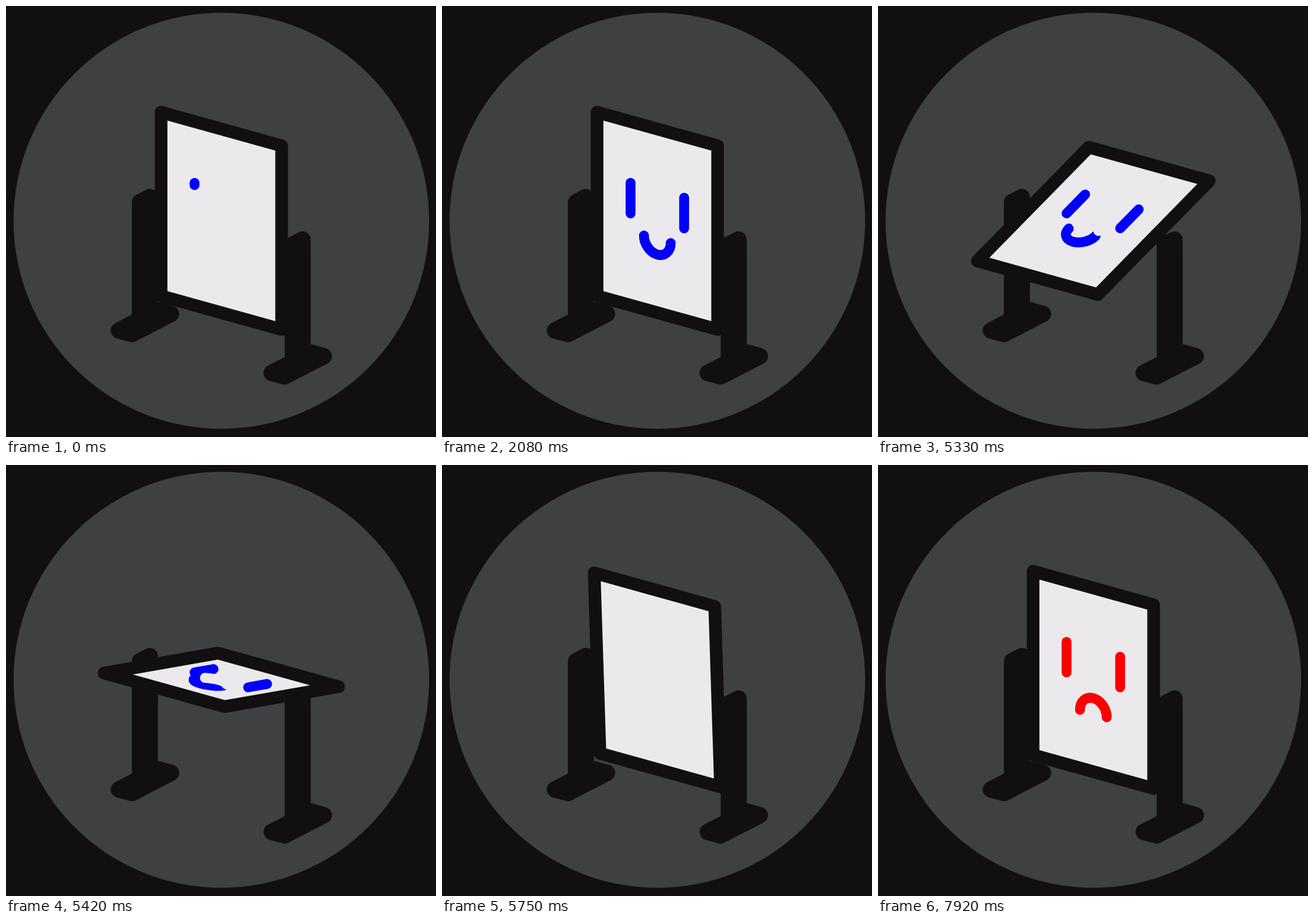
These frames come from a looping animation (748x749 px, 8000 ms). An HTML page with a canvas:

```html
<!DOCTYPE html>
<html lang="en">
<head>
<meta charset="utf-8">
<title>Flipping board</title>
<style>
  html, body { margin: 0; height: 100%; overflow: hidden; background: #110f12; }
  canvas { display: block; }
</style>
</head>
<body>
<canvas id="stage" width="748" height="749"></canvas>
<script>
const ctx = document.getElementById('stage').getContext('2d');
const DARK = '#110f12', GREY = '#3e4041', WHITE = '#ece9ec';
const LOOP = 8000, STEP = 1000 / 12;

// Isometric view: one board unit in pixels, turned by YAW and tilted by PITCH.
const UNIT = 28.8, YAW = Math.PI / 5, PITCH = Math.PI / 8;
const CENTER = [374.6, 373.4];
const ACROSS = [UNIT * Math.cos(YAW), UNIT * Math.sin(YAW) * Math.sin(PITCH)];
const FRONT = [-UNIT * Math.sin(YAW), UNIT * Math.cos(YAW) * Math.sin(PITCH)];
const HEIGHT = UNIT * Math.cos(PITCH);

const clamp = x => Math.min(1, Math.max(0, x));
const smooth = x => x * x * (3 - 2 * x);

function polygon(points, width, fill = DARK) {
  ctx.beginPath();
  points.forEach(([x, y]) => ctx.lineTo(x, y));
  ctx.closePath();
  ctx.fillStyle = fill;
  ctx.fill();
  ctx.strokeStyle = DARK;
  ctx.lineWidth = width;
  ctx.stroke();
}

function leg(dx, dy) {
  ctx.save();
  ctx.translate(dx, dy);
  polygon([[233.3, 341], [250, 332.2], [250, 540], [233.3, 550]], 28.6);
  polygon([[196.5, 564], [219, 570], [287, 535], [264.5, 528.8]], 28.6);
  ctx.restore();
}

// Builds a path in board units, then strokes it with an even screen width.
function line(down, color, build) {
  ctx.save();
  ctx.transform(...ACROSS, ...down, ...CENTER);
  ctx.beginPath();
  build();
  ctx.restore();
  ctx.strokeStyle = color;
  ctx.lineWidth = 17.2;
  ctx.stroke();
}

// Left eye, right eye and mouth appear one after the other.
function face(down, color, happy, progress) {
  const length = progress * 7;
  [-2, 2].forEach((x, i) => {
    const part = Math.min(2, length - 2 * i);
    if (part > 0) line(down, color, () => {
      ctx.moveTo(x, -2);
      ctx.lineTo(x, part - 2);
    });
  });
  const mouth = clamp((length - 4) / 3);
  if (!mouth) return;
  const side = happy ? -1 : 1, y = happy ? 1.2 : 2.2;
  const arc = from => () =>
    ctx.arc(0, y, 1, Math.PI + side * from * Math.PI, Math.PI + side * Math.PI, happy);
  line(down, color, arc(0));
  if (mouth < 1) line(down, WHITE, arc(mouth));
}

function board(t) {
  const u = clamp((t - 5000) / 900);
  const turn = 1 - (1 - u * u) ** 3.5;
  const c = Math.cos(turn * Math.PI), s = Math.sin(turn * Math.PI);
  const down = [FRONT[0] * s, HEIGHT * c + FRONT[1] * s];
  const at = (x, y) => CENTER.map((v, i) => v + ACROSS[i] * x + down[i] * y);
  polygon([at(-4.5, -6), at(4.5, -6), at(4.5, 6), at(-4.5, 6)], 22, WHITE);

  const drawn = start => smooth(clamp((t - start) / 690));
  const facing = ACROSS[0] * down[1] - ACROSS[1] * down[0] > 0;
  if (facing) {
    face(down, '#00f', true, drawn(-60));
    if (turn > 0.35) line(down, WHITE, () => ctx.arc(0, 1.2, 1, -0.5, -2.5, true));
  } else {
    face(down.map(v => -v), '#f00', false, drawn(5940));
  }
}

function draw(now) {
  const t = Math.floor((now % LOOP + 5) / STEP) * STEP % LOOP;
  ctx.fillStyle = DARK;
  ctx.fillRect(0, 0, 748, 749);
  ctx.fillStyle = GREY;
  ctx.beginPath();
  ctx.arc(374.6, 373.3, 361.5, 0, 2 * Math.PI);
  ctx.fill();
  ctx.lineCap = ctx.lineJoin = 'round';
  leg(0, 0);
  board(t);
  leg(265.8, 73.6);
}

const begin = performance.now();
function tick() {
  draw(performance.now() - begin);
  requestAnimationFrame(tick);
}
tick();
</script>
</body>
</html>
```
